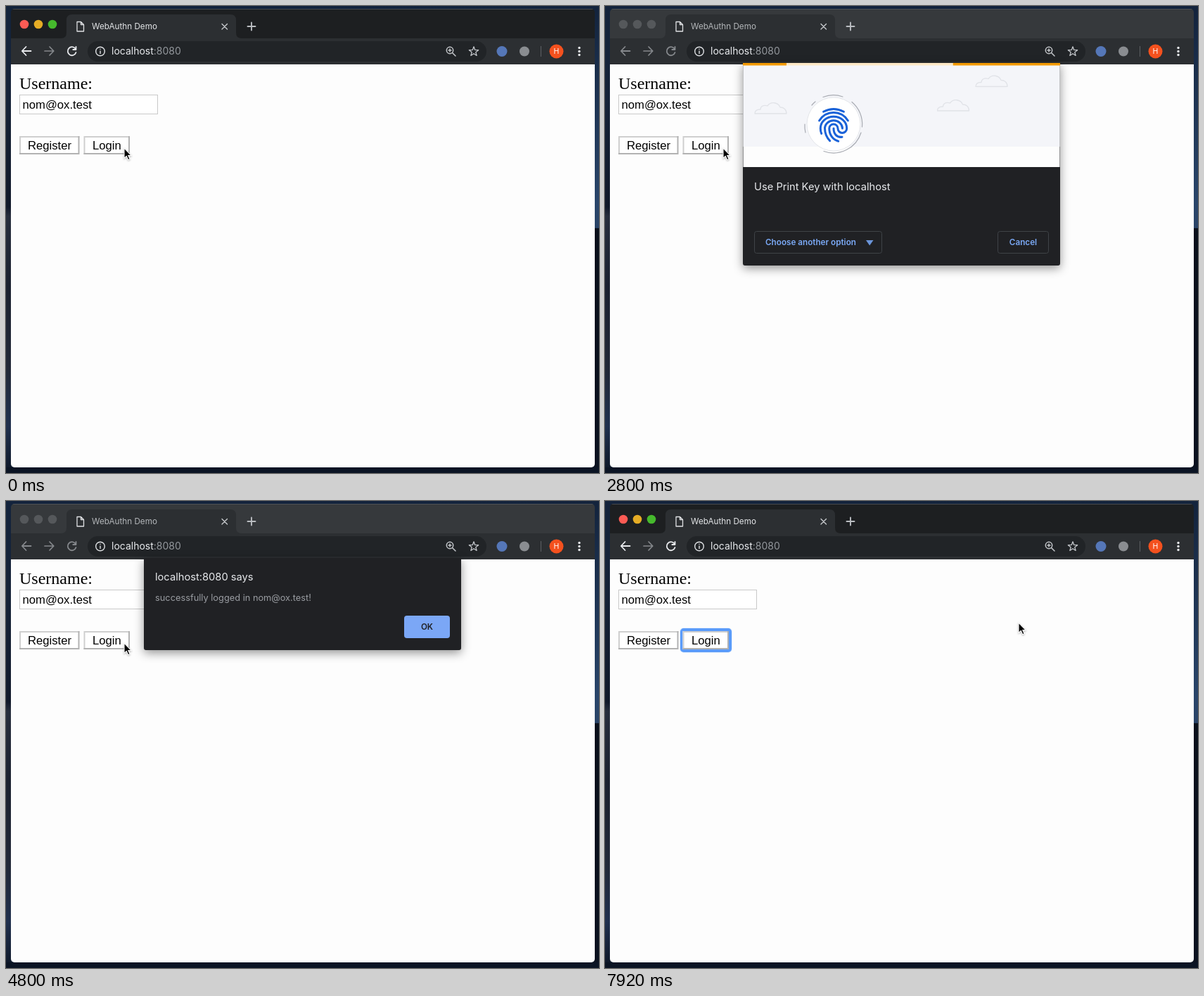
Write an HTML page that moves like this. It is 843 px wide and 664 px high and loops after 8000 ms.

```html
<!DOCTYPE html>
<html lang="en">
<head>
<meta charset="utf-8">
<title>WebAuthn Demo</title>
<style>
html, body { margin: 0; width: 100%; height: 100%; overflow: hidden; background: #0c1422; }
svg { display: block; position: absolute; left: 0; top: 0; }
text { font-family: Inter, sans-serif; white-space: pre; }
.page text { font: 16.67px "Liberation Sans", Arial, sans-serif; fill: #000; }
.page .label { font: 24px "Liberation Serif", Times, serif; }
.line { fill: none; stroke-linecap: round; stroke-linejoin: round; }
.strip { fill: #1d1f21; }
.title { font-size: 11.7px; fill: #e4e6e8; }
.nav { stroke: #e8eaed; stroke-width: 1.8; }
.idle .strip { fill: #36393c; }
.blur .title { fill: #b4b7ba; }
.blur .nav { stroke: #85888c; }
.blur .light { fill: #55585b; }
.link { font-size: 11.7px; font-weight: 600; fill: #7baaf7; }
.head { font-size: 14.7px; fill: #e8eaed; }
.sheet { filter: drop-shadow(0 4px 7px rgba(0,0,0,.42)); }
.system { filter: drop-shadow(0 12px 17px rgba(0,0,0,.6)); }
.system text { fill: #e6e6e7; }
.system .bold { font-size: 13px; font-weight: 700; }
.system .push { font-size: 12.8px; }
</style>
</head>
<body>
<svg id="stage" width="843" height="664" viewBox="0 0 843 664">
  <defs>
    <linearGradient id="left" x1="0" y1="0" x2="0" y2="1">
      <stop offset="0" stop-color="#13233c"/><stop offset=".2" stop-color="#162338"/>
      <stop offset=".43" stop-color="#11192a"/><stop offset=".45" stop-color="#272e3d"/>
      <stop offset=".6" stop-color="#1b2130"/><stop offset=".78" stop-color="#222938"/>
      <stop offset=".9" stop-color="#20304e"/><stop offset="1" stop-color="#0d1626"/>
    </linearGradient>
    <linearGradient id="right" x1="0" y1="0" x2="0" y2="1">
      <stop offset="0" stop-color="#13233c"/><stop offset=".42" stop-color="#29456a"/>
      <stop offset=".475" stop-color="#2a4468"/><stop offset=".476" stop-color="#0a101b"/>
      <stop offset="1" stop-color="#0b1220"/>
    </linearGradient>
    <linearGradient id="bar" x1="0" y1="0" x2="0" y2="1">
      <stop offset="0" stop-color="#3a3b3d"/><stop offset="1" stop-color="#2d2e30"/>
    </linearGradient>
    <clipPath id="frame"><rect x="7" y="4" width="830" height="652" rx="5"/></clipPath>
    <clipPath id="disc"><circle r="23.5"/></clipPath>
    <path id="cloud" class="line" stroke="#e1e3e8" stroke-width="1.3"
      d="M0 0H45C45-6 41-9 36-9C33-16 23-18 18-11C12-13 8-10 8-6C3-6 0-4 0 0Z"/>
  </defs>

  <rect width="843" height="664" fill="#0c1524"/>
  <rect width="421" height="664" fill="url(#left)"/>
  <rect x="421" width="422" height="664" fill="url(#right)"/>
  <rect y="656" width="843" height="8" fill="#0b1424"/>

  <g clip-path="url(#frame)">
    <rect class="strip" x="7" y="4" width="830" height="43"/>
    <path d="M7 4.5H837" stroke="#5a5d60" stroke-opacity=".7"/>
    <path fill="#2c2f32" d="M7 83V46H78Q86 46 86 38V20Q86 12 94 12H319Q327 12 327 20V38Q327 46 335 46H837V83Z"/>
    <rect x="116" y="50" width="567" height="29" rx="14.5" fill="#212427"/>
    <rect x="7" y="83" width="830" height="573" fill="#fdfdfd"/>
  </g>

  <circle class="light" cx="26" cy="26" r="6.3" fill="#fc5b54"/>
  <circle class="light" cx="46" cy="26" r="6.3" fill="#e5ac25"/>
  <circle class="light" cx="66" cy="26" r="6.3" fill="#46b92d"/>

  <path class="line" stroke="#dfe1e4" stroke-width="1.3" d="M101 22.5H106.5L110.5 26.5V36H101ZM106.5 22.5V26.5H110.5"/>
  <text class="title" x="122" y="33">WebAuthn Demo</text>
  <path class="line" stroke="#c6c9cc" stroke-width="1.4" d="M307 25.5L314.5 33M314.5 25.5L307 33"/>
  <path class="line" stroke="#b9bcc0" stroke-width="1.9" d="M343.5 29H354.500M349 23.500V34.500"/>

  <path class="line nav" d="M35.500 64H23M28.500 58L22.800 64L28.500 70"/>
  <path class="line" stroke="#85888c" stroke-width="1.7" d="M55 64H67.500M62 58L67.800 64L62 70"/>
  <path class="line nav" d="M98.500 60.500A6 6 0 1 0 99.500 66M99.500 58V62H95.300"/>
  <g class="line" stroke="#dfe1e4" stroke-width="1.4">
    <circle cx="134" cy="64.500" r="6.300"/><path d="M134 64V67.500M134 61.300V61.400"/>
  </g>
  <text x="150" y="69.300" font-size="14" fill="#e8eaed">localhost<tspan fill="#94989d">:8080</tspan></text>

  <g class="line" stroke="#c3c6ca" stroke-width="1.5">
    <circle cx="631" cy="63" r="4.700"/><path d="M634.500 66.500L639 71M629 63H633M631 61V65"/>
    <path stroke-width="1.300" id="star"/>
  </g>
  <circle cx="705" cy="64.500" r="7.500" fill="#5577b8"/>
  <circle cx="737" cy="64.500" r="7" fill="#8a8d91"/>
  <path d="M760.500 57V72" stroke="#5d6064"/>
  <circle cx="782.500" cy="64.500" r="10" fill="#f4511e"/>
  <text x="782.500" y="68.300" font-size="10.500" fill="#fff" text-anchor="middle">H</text>
  <g fill="#e8eaed"><circle cx="815" cy="59.500" r="1.700"/><circle cx="815" cy="64.500" r="1.700"/><circle cx="815" cy="69.500" r="1.700"/></g>

  <g class="page">
    <text class="label" x="19" y="118">Username:</text>
    <rect x="19.500" y="126.500" width="196" height="27" fill="#fff" stroke="#c9c9c9"/>
    <text x="23.500" y="146">nom@ox.test</text>
    <g id="ring" class="line" stroke="#5a9bfa">
      <rect x="109" y="183" width="69" height="30" rx="3" stroke-width="4"/>
      <rect x="107.500" y="181.500" width="72" height="33" rx="4" stroke-opacity=".35" stroke-width="2"/>
    </g>
    <g id="buttons"></g>
    <text x="31" y="204">Register</text>
    <text x="123" y="204">Login</text>
  </g>

  <g id="sheet" class="sheet">
    <path fill="#202124" d="M196 81H647V366Q647 369 644 369H199Q196 369 196 366Z"/>
    <rect x="196.500" y="84" width="450" height="145" fill="#fdfdfd"/>
    <rect x="196.500" y="84" width="450" height="116" fill="#f4f5f9"/>
    <rect x="196" y="81" width="451" height="3.500" fill="#fce8c5"/>
    <rect id="run1" y="81" height="3.500" fill="#f29900"/>
    <rect id="run2" y="81" height="3.500" fill="#f29900"/>
    <use href="#cloud" x="213" y="153"/><use href="#cloud" x="472.500" y="149"/><use href="#cloud" x="527" y="114.500"/>
    <circle cx="325" cy="168" r="38" fill="#fff" stroke="#e4e6ea"/>
    <g class="line" stroke="#a9acb3" stroke-width="1.200">
      <path d="M310 129.500A41 41 0 0 1 338 129M351 136.500A41 41 0 0 1 365.500 172M364 180A41 41 0 0 1 311 206.500M294 141A41 41 0 0 1 299 136M285 180A41 41 0 0 1 284 168"/>
    </g>
    <g class="line" stroke="#1a62d8" stroke-width="1.250" transform="translate(296.200 139.700) scale(2.400)">
      <path d="M6 4.400Q12 1.300 18 4.400M3.500 9.700Q6.500 4.900 12 4.900T20.500 9.700"/>
      <path d="M17 19.400C13.800 19.800 12 17.500 12 14.300"/>
      <path d="M14.800 21.900C11.500 21 9.400 18 9.400 14.300A2.550 2.500 0 0 1 14.500 14.300C14.500 15.800 15.700 17 17.100 17S19.800 15.800 19.800 14.300C19.800 10.400 16.400 7.300 12 7.300S4.200 10.400 4.200 14.300Q4.200 16 4.800 17.400"/>
      <path d="M9.800 21.700C8 19.800 6.800 17.500 6.800 14.300A5.200 4.700 0 0 1 17.200 14.300"/>
    </g>
    <text class="head" x="212" y="261.500">Use Print Key with localhost</text>
    <g fill="none" stroke="#3f4347">
      <rect x="212.500" y="320.500" width="181" height="31" rx="3"/>
      <rect x="558.500" y="320.500" width="72" height="31" rx="3"/>
    </g>
    <text class="link" x="228" y="340">Choose another option</text>
    <path fill="#6b95da" d="M371 333H381.500L376.200 340.500Z"/>
    <text class="link" x="594.500" y="340" text-anchor="middle">Cancel</text>
  </g>

  <g id="system">
    <rect class="system" x="189" y="99" width="447" height="165" rx="5" fill="#2a2b2d"/>
    <path fill="url(#bar)" d="M189 121V104Q189 99 194 99H631Q636 99 636 104V121Z"/>
    <path d="M189 121.500H636" stroke="#1b1c1e"/>
    <rect x="189.500" y="99.500" width="446" height="164" rx="5" fill="none" stroke="#606265"/>
    <g class="system" style="filter:none">
      <circle cx="242" cy="173.500" r="28.800" fill="#f3f3f4"/>
      <g id="whorl" class="line" transform="translate(242 173.500)" clip-path="url(#disc)" stroke="#e5486a" stroke-width="1.300"></g>
      <circle cx="256" cy="190.500" r="15" fill="#df4a3c"/>
      <text class="bold" x="286" y="155">“Maroon Cobble” is trying to verify your identity</text>
      <text class="bold" x="286" y="171">on localhost.</text>
      <text x="286" y="193" font-size="11">Print Key or enter your password to allow this.</text>
      <rect x="408" y="223" width="124" height="19.500" rx="3" fill="#5d5f61"/>
      <rect x="546" y="223" width="69" height="19.500" rx="3" fill="#5d5f61"/>
      <text class="push" x="470" y="237.500" text-anchor="middle">Use Password...</text>
      <text class="push" x="580.500" y="237.500" text-anchor="middle">Cancel</text>
    </g>
  </g>

  <g id="alert" class="sheet">
    <path fill="#202124" d="M196 81H647V209Q647 212 644 212H199Q196 212 196 209Z"/>
    <text class="head" x="212" y="112.500">localhost:8080 says</text>
    <text x="212" y="142" font-size="12.800" fill="#9a9da2">successfully logged in nom@ox.test!</text>
    <rect id="ok" x="566" y="163" width="65" height="32" rx="4"/>
    <text x="598.500" y="183" font-size="11.700" font-weight="600" fill="#202124" text-anchor="middle">OK</text>
  </g>

  <path id="cursor" d="M0 0V14.500L3.300 11.400L5.700 16.700L8.100 15.700L5.800 10.600H10.200Z" fill="#000" stroke="#fff" stroke-width="1.100" style="filter:drop-shadow(0 1px 1px rgba(0,0,0,.3))"/>
</svg>

<script>
const LOOP = 8000, STEP = 80;
const $ = id => document.getElementById(id);

// Shown intervals in ms
const shown = {
  ring: [[1360, 1840], [7840, 8000]],
  sheet: [[2000, 4640]],
  system: [[3040, 4480]],
  alert: [[4720, 7760]]
};
// Pointer keys: time, x, y
const path = [[5520, 168, 202], [6480, 590, 176], [6720, 588, 173]];

function button(x, w, id) {
  return `<rect id="${id}" x="${x}" y="185" width="${w}" height="26" fill="#fff"/>
    <path d="M${x + 1} 211V186H${x + w}" fill="none" stroke="#cfcfcf" stroke-width="2"/>
    <path d="M${x + w - 1} 185V210H${x}" fill="none" stroke="#b2b2b2" stroke-width="2"/>`;
}
$('buttons').innerHTML = button(19, 85.500, 'register') + button(110.500, 65.500, 'login');

let ridges = '';
for (let r = 1.500; r < 26; r += 2.600)
  ridges += `M${-r} 26Q${-r - 2} 12 ${-r} 3A${r} ${r * .95} 0 0 1 ${r} 3Q${r + 2} 12 ${r - 1} 26`;
$('whorl').innerHTML = `<path d="${ridges}"/>`;

let star = '';
for (let i = 0; i < 10; i++) {
  const a = (i / 5 - .5) * Math.PI, r = i % 2 ? 2.900 : 7;
  star += (i ? 'L' : 'M') + (665 + r * Math.cos(a)) + ' ' + (64.800 + r * Math.sin(a));
}
$('star').setAttribute('d', star + 'Z');

const within = (t, a, b) => t >= a && t < b;

function span(id, a, b) {
  $(id).setAttribute('x', 196 + 451 * a);
  $(id).setAttribute('width', 451 * Math.max(0, b - a));
}

// Two bars chase each other over one 1600 ms cycle
function progress(t) {
  const p = ((t - 1780) / 1600 + 2) % 1;
  span('run1', p < .5 ? p / 2 : Math.min(1, 3 * p - 1.250), Math.min(1, 2 * p));
  span('run2', Math.max(0, 4 * p - 3), p < .75 ? Math.max(0, p - .5) : 3 * p - 2);
}

function pointer(t) {
  let [, x, y] = path[0];
  for (let i = 1; i < path.length; i++) {
    const [t0, x0, y0] = path[i - 1], [t1, x1, y1] = path[i];
    if (t < t0) break;
    const u = Math.min(1, (t - t0) / (t1 - t0)), e = u * u * (3 - 2 * u);
    x = x0 + (x1 - x0) * e;
    y = y0 + (y1 - y0) * e;
  }
  $('cursor').setAttribute('transform', `translate(${x} ${y})`);
}

function draw(now) {
  const t = Math.floor(now % LOOP / STEP) * STEP;
  for (const id in shown)
    $(id).style.display = shown[id].some(([a, b]) => within(t, a, b)) ? '' : 'none';
  $('stage').classList.toggle('blur', within(t, 1760, 7840));
  $('stage').classList.toggle('idle', within(t, 2000, 7840));
  $('login').setAttribute('fill', within(t, 1360, 1520) ? '#e4e4e4' : '#fff');
  $('ok').setAttribute('fill', within(t, 7440, 7520) ? '#6d92d4' : t >= 6400 ? '#7ba2e8' : '#7ba7f6');
  progress(t);
  pointer(t);
}

const start = performance.now();
function tick() {
  draw(performance.now() - start);
  requestAnimationFrame(tick);
}
tick();
</script>
</body>
</html>
```
